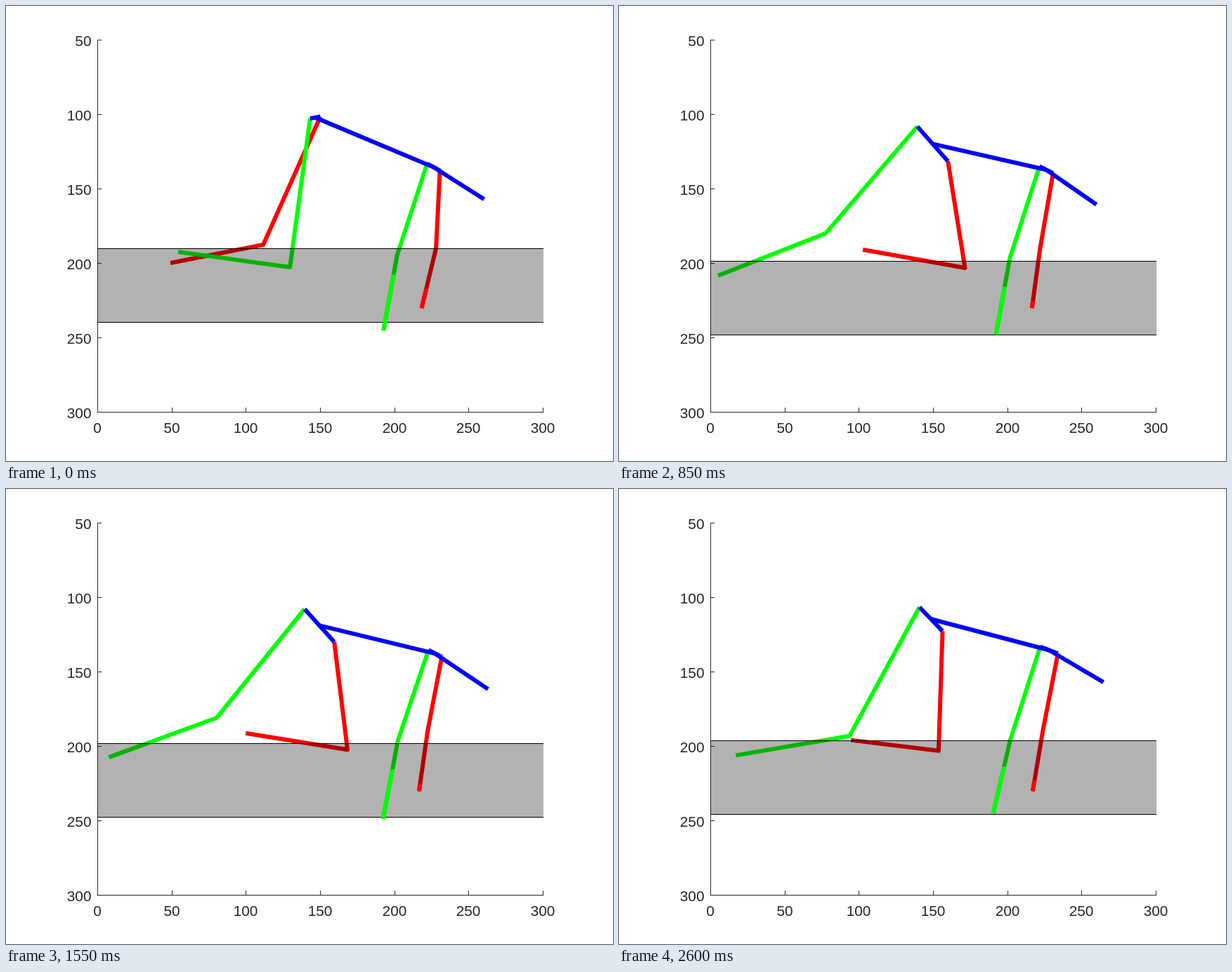
These frames come from a looping animation (864 px wide and 648 px high, 2650 ms). An HTML page with a canvas:

```html
<!DOCTYPE html>
<html lang="en">
<head>
<meta charset="utf-8">
<title>Stick figure gait</title>
<style>
html, body { margin: 0; width: 100%; height: 100%; overflow: hidden; background: #fff; }
canvas { display: block; width: 864px; height: 648px; }
</style>
</head>
<body>
<canvas id="stage" width="864" height="648"></canvas>
<script>
const ctx = document.getElementById('stage').getContext('2d');
const LOOP = 2650, STEP = 50, CYCLE = 711;
const RED = '#f00', GREEN = '#0f0', BLUE = '#00f', INK = '#262626';

// Stride phases in ms and the key points of the legs at those phases
const PHASES = [0, 89, 412, 450, 539];
const hipPath = [[150, 101.5], [159.8, 131.5], [156.6, 124], [149, 100], [144.8, 104.3]];
const leftKnee = [[129.5, 202.7], [77.4, 180], [91, 192.4], [136.5, 205.5], [156.4, 208.4]];
const leftFoot = [[54.2, 192.4], [5, 208.4], [14, 206.8], [68, 195.7], [81.6, 192.8]];
const rightKnee = [[111.5, 187.6], [171.3, 203.2], [156.4, 204.2], [103.4, 182.9], [87.3, 172]];
const rightFoot = [[49, 199.9], [102.5, 190.9], [97.7, 196.4], [35.3, 188.1], [14.9, 200.4]];
const bandTop = [[190.2], [198.5], [196.8], [186], [190.7]];

const X = x => 130.5 + x * 2.1133;
const Y = y => 48.5 + (y - 50) * 2.118;
const mid = (a, b) => [(a[0] + b[0]) / 2, (a[1] + b[1]) / 2];
const wave = (t, period) => Math.cos(2 * Math.PI * t / period);

// Closed cubic spline through a path's key points
function along(path, phase) {
  const n = PHASES.length;
  const time = j => PHASES[(j + n) % n] + Math.floor(j / n) * CYCLE;
  const point = j => path[(j + n) % n];
  let i = n - 1;
  while (phase < PHASES[i]) i--;
  const h = time(i + 1) - time(i), u = (phase - time(i)) / h;
  const s = u * u * (3 - 2 * u), a = u * (1 - u) * (1 - u), b = u * u * (u - 1);
  const slope = (j, k) => (point(j + 1)[k] - point(j - 1)[k]) / (time(j + 1) - time(j - 1));
  return point(i).map((v, k) =>
    v + (point(i + 1)[k] - v) * s + h * (a * slope(i, k) + b * slope(i + 1, k)));
}

function line(color, ...pts) {
  ctx.strokeStyle = color;
  ctx.beginPath();
  pts.forEach(([x, y]) => ctx.lineTo(X(x), Y(y)));
  ctx.stroke();
}

function lineBelow(y, color, pts) {
  ctx.save();
  ctx.beginPath();
  ctx.rect(130, Y(y), 635, 648);
  ctx.clip();
  line(color, ...pts);
  ctx.restore();
}

function drawBand(band) {
  const top = Math.floor(Y(band)), height = 105;
  ctx.fillStyle = 'rgba(0,0,0,0.3)';
  ctx.fillRect(130, top, 635, height);
  ctx.fillStyle = '#000';
  ctx.fillRect(130, top, 635, 1);
  ctx.fillRect(130, top + height, 635, 1);
}

function drawFigure(t) {
  const phase = (t - STEP) % CYCLE;
  const at = path => along(path, phase);
  const [band] = at(bandTop);

  // The left hip moves against the right one
  const hipR = at(hipPath);
  const hipL = [143.5 - 0.4 * (hipR[0] - 149), 103 + 0.18 * (hipR[1] - 103)];
  const dip = hipR[1] - 101;

  // The upper body sways with the stride and drifts slowly over the loop
  const sway = -wave(phase, CYCLE);
  const lift = -2.5 * wave(t, LOOP);
  const drift = 2.2 * wave(t - 1900, LOOP) + 2 * sway;
  const head = [263 + drift, 159.5 + lift];
  const neck = [227.3 + 0.4 * drift, 136.7 + 0.5 * lift];
  const half = 5.2 + 0.9 * sway;
  const shL = [neck[0] - half, neck[1] - 2.3];
  const shR = [neck[0] + half, neck[1] + 2.3];
  const armL = [shL, [202 + (shL[0] - 222.5) / 2, 195 + (band - 192) / 4],
    [191.3 - 1.2 * sway, 247.3 + 0.8 * lift]];
  const armR = [shR, [228 - 0.2 * dip, 190], [218.2 - 0.06 * dip, 230.3]];

  ctx.save();
  ctx.beginPath();
  ctx.rect(130, 48, 635, 530);
  ctx.clip();
  ctx.lineWidth = 6;
  ctx.lineJoin = 'round';
  line(RED, hipR, at(rightKnee), at(rightFoot));
  line(RED, ...armR);
  line(GREEN, hipL, at(leftKnee), at(leftFoot));
  line(GREEN, ...armL);
  line(BLUE, hipL, hipR);
  line(BLUE, mid(hipL, hipR), neck);
  line(BLUE, shL, shR);
  line(BLUE, neck, head);
  drawBand(band);
  lineBelow(band + 27, RED, armR);
  lineBelow(band + 17.5, GREEN, armL);
  ctx.restore();
}

function drawAxes() {
  ctx.fillStyle = INK;
  ctx.fillRect(130, 48, 1, 531);
  ctx.fillRect(130, 578, 635, 1);
  ctx.font = '20.8px "Liberation Sans", Arial, sans-serif';
  for (let v = 0; v <= 300; v += 50) {
    const x = Math.floor(X(v)), y = Math.floor(Y(v));
    ctx.fillRect(x, 572, 1, 6);
    ctx.textAlign = 'center';
    ctx.fillText(v, x, 608);
    if (!v) continue;
    ctx.fillRect(130, y, 6, 1);
    ctx.textAlign = 'right';
    ctx.fillText(v, 121.5, y + 9);
  }
}

const start = performance.now();
function render() {
  const t = (performance.now() - start) % LOOP;
  ctx.fillStyle = '#fff';
  ctx.fillRect(0, 0, 864, 648);
  drawAxes();
  drawFigure(Math.max(STEP, Math.floor(t / STEP) * STEP));
  requestAnimationFrame(render);
}
render();
</script>
</body>
</html>
```
